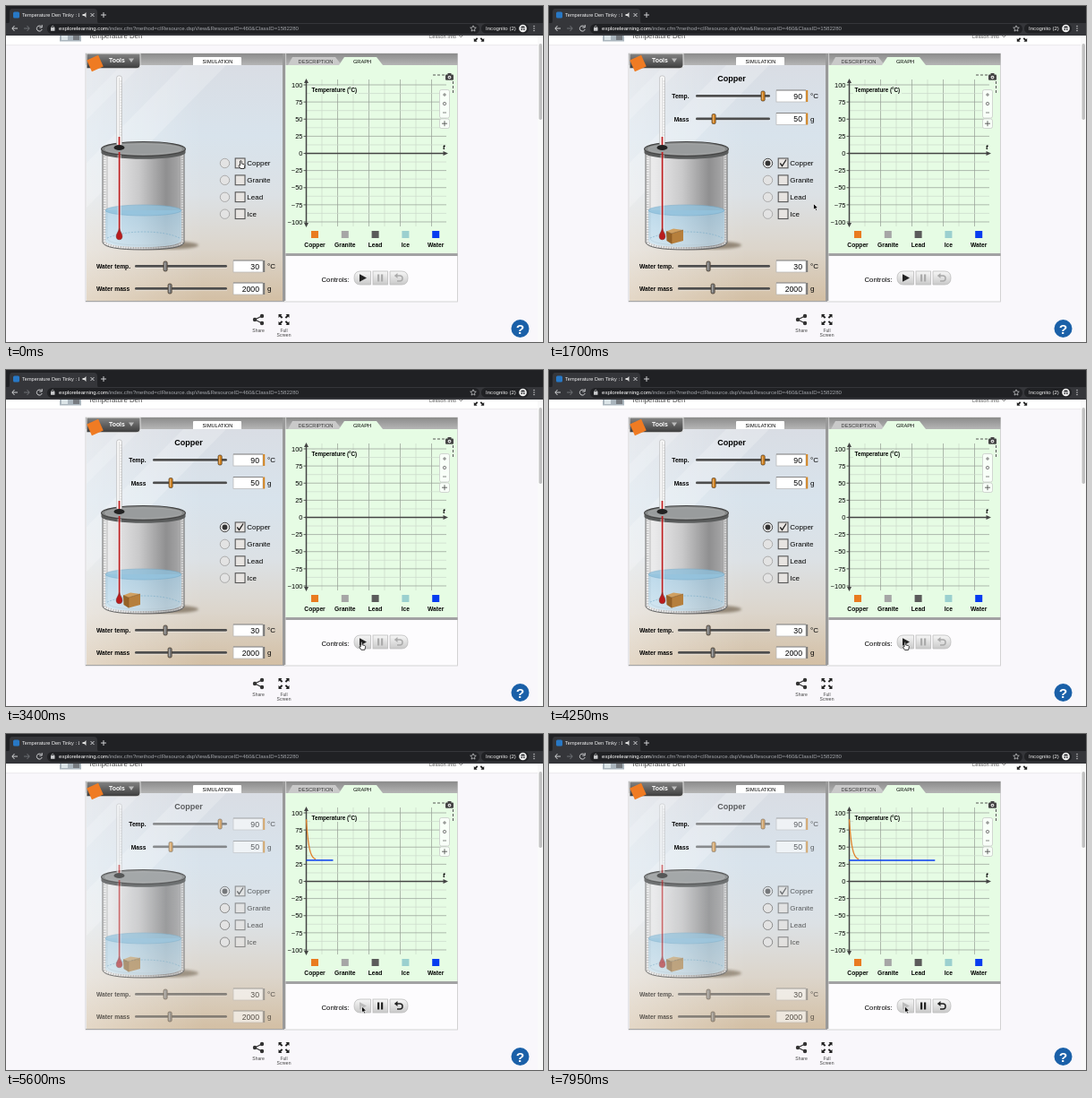
Recreate the animation shown at these times as an HTML page. Size 600x375 px, loop 8 s.

```html
<!DOCTYPE html>
<html lang="en">
<head>
<meta charset="utf-8">
<title>Heat experiment</title>
<style>
html, body { margin: 0; width: 100%; height: 100%; overflow: hidden; background: #fff; }
svg { display: block; width: 100vw; height: 100vh; }
text { font-family: "Liberation Sans", Arial, sans-serif; }
</style>
</head>
<body>
<svg id="stage" viewBox="0 0 600 375"></svg>
<script>
const LOOP = 8000, PICK = 450, START = 4530;
const stage = document.getElementById("stage");

const text = (x, y, size, label, extra = "") => `<text x="${x}" y="${y}" font-size="${size}" ${extra}>${label}</text>`;
const rect = (x, y, w, h, fill, extra = "") => `<rect x="${x}" y="${y}" width="${w}" height="${h}" fill="${fill}" ${extra}/>`;
const path = (d, fill, extra = "") => `<path d="${d}" fill="${fill}" ${extra}/>`;
const line = (d, stroke, width = 1, extra = "") => path(d, "none", `stroke="${stroke}" stroke-width="${width}" ${extra}`);
const oval = (x, y, rx, ry, fill, extra = "") => `<ellipse cx="${x}" cy="${y}" rx="${rx}" ry="${ry}" fill="${fill}" ${extra}/>`;
const gradient = (id, dir, stops) => `<linearGradient id="${id}" x2="${dir === "x" ? 1 : 0}" y2="${dir === "y" ? 1 : 0}">` +
  stops.map(([at, color]) => `<stop offset="${at}" stop-color="${color}"/>`).join("") + "</linearGradient>";
const bold = 'font-weight="bold"', middle = 'text-anchor="middle"', end = 'text-anchor="end"';

const defs = `<defs>
  ${gradient("panel", "y", [[0, "#d9dde4"], [.3, "#d8e3ec"], [.55, "#dce1e5"], [.78, "#dcd5cb"], [1, "#d3bfa4"]])}
  ${gradient("glow", "x", [[0, "#ffffff60"], [.6, "#ffffff00"]])}
  ${gradient("bar", "y", [[0, "#8b8b8b"], [1, "#b5b5b5"]])}
  ${gradient("tools", "y", [[0, "#858585"], [1, "#3c3c3c"]])}
  ${gradient("metal", "x", [[0, "#eee"], [.12, "#e9e9ea"], [.45, "#c9c9ca"], [.78, "#8f8f90"], [.92, "#a2a2a3"], [1, "#ddd"]])}
  ${gradient("water", "y", [[0, "#a9d2ea"], [1, "#c9e4f3"]])}
  ${gradient("button", "y", [[0, "#f7f7f7"], [1, "#c9c9c9"]])}
  <clipPath id="tabClip"><rect x="17" y="4" width="65" height="14"/></clipPath>
  <clipPath id="panelClip"><rect x="90" y="66" width="219" height="263"/></clipPath>
  <filter id="soft"><feGaussianBlur stdDeviation="1.6"/></filter>
</defs>`;

function browser() {
  return rect(0, 0, 600, 20, "#202124") +
    path("M1 20Q4 20 4 16V7Q4 3 7 3H98Q102 3 102 7V16Q102 20 105 20Z", "#35363a") +
    rect(0, 19, 600, 14, "#35363a") + rect(46, 20, 483, 11, "#202124", 'rx="5.5"') +
    rect(8, 6.5, 7, 7, "#2878c5", 'rx="1.5"') +
    text(18, 12.4, 5.6, "Temperature Den Tinky : Le", 'fill="#f0f0f1" clip-path="url(#tabClip)"') +
    path("M85.5 9H87.5L89.5 7V13L87.5 11H85.5Z", "#ddd") +
    line("M94.5 8L98.5 12M98.5 8L94.5 12M106 10H112M109 7V13", "#dedfe1", .9) +
    line("M13 25H7M9.5 22L6.8 25L9.5 28", "#e3e4e6", .9) +
    line("M20 25H26M23.5 22L26.2 25L23.5 28", "#75777b", .9) +
    line("M39.5 23A3 3 0 1 0 40.2 26M40.2 21V24H37.3", "#dedfe1", .9) +
    rect(50, 24, 4.5, 3.8, "#c8c9cb", 'rx=".5"') + line("M51 24V23Q52.2 21 53.5 23V24", "#c8c9cb", .7) +
    text(59, 27, 6.1, '<tspan fill="#fff">explorelearning.com</tspan>/index.cfm?method=cIResource.dspView&amp;ResourceID=460&amp;ClassID=1582280', 'fill="#a2a5aa"') +
    path("M522 21.8L523 24L525.3 24.2L523.5 25.8L524 28.1L522 26.9L520 28.1L520.5 25.8L518.7 24.2L521 24Z", "none", 'stroke="#d0d1d3" stroke-width=".7"') +
    rect(531, 19.8, 53, 10.8, "#202124", 'rx="5.2"') +
    text(536, 27.1, 6.1, "Incognito (2)", 'fill="#eee"') + oval(577.5, 25, 4.3, 4.3, "#f1f1f1") +
    path("M575 24.5H580L579 22.4H576Z", "#35363a") + oval(576.3, 26.2, .9, .9, "#35363a") + oval(578.8, 26.2, .9, .9, "#35363a") +
    [22.5, 25, 27.5].map(y => oval(590, y, .7, .7, "#ddd")).join("");
}

const fullscreen = (x, y, s, color) =>
  `<g transform="translate(${x} ${y}) scale(${s})">` + [0, 90, 180, 270].map(a =>
    `<g transform="rotate(${a})">${path("M-6 -6H-2L-3.3 -4.7L-1.2 -2.6L-2.6 -1.2L-4.7 -3.3L-6 -2Z", color)}</g>`).join("") + "</g>";

function page() {
  return rect(0, 33, 600, 342, "#f9f7fb") + rect(0, 33, 594, 10.5, "#fff") +
    rect(60, 32, 24, 7.5, "#aab5bd") + rect(62, 32, 7, 6, "#dce5e8") + rect(75, 33, 7, 5, "#777b80") +
    text(92, 36.2, 7.8, "Temperature Den", 'fill="#444"') +
    text(473, 35.8, 5.8, "Lesson Info", 'fill="#555"') + line("M506 32.5L508.3 34.8L510.6 32.5", "#555", .9) +
    fullscreen(528.5, 34, .95, "#222") + line("M0 43.6H594", "#e4e3e6", .7) +
    rect(594, 33, 6, 342, "#fafafa") + rect(595.5, 42, 3.5, 85, "#c1c1c1", 'rx="1.7"') +
    browser() +
    line("M286 346L278 350L286 354", "#333", 1.2) +
    [[286, 346], [278, 350], [286, 354]].map(([x, y]) => oval(x, y, 2.2, 2.2, "#333")).join("") +
    text(282, 364, 5, "Share", middle + ' fill="#444"') + fullscreen(310.5, 350, 1, "#222") +
    text(310.5, 364, 5, "Full", middle + ' fill="#444"') + text(310.5, 369, 5, "Screen", middle + ' fill="#444"') +
    oval(574.5, 360, 10, 10, "#1a60a8") + text(574.5, 365.5, 15.5, "?", `${middle} ${bold} fill="#fff"`);
}

function panels() {
  return rect(89, 53, 415.5, 277, "#fdfcfe", 'stroke="#c9c9c9" stroke-width=".8"') +
    rect(90, 66, 219, 263, "url(#panel)") + rect(90, 66, 219, 263, "url(#glow)") +
    `<g clip-path="url(#panelClip)" fill="#fff">
      <path d="M90 175L198 66H246L90 225Z" opacity=".2"/>
      <path d="M90 105L129 66H151L90 127Z" opacity=".16"/>
    </g>` +
    rect(89, 53, 415.5, 13, "url(#bar)") + rect(309, 53, 3.3, 276, "#999") + rect(312.3, 53, .8, 225, "#ddd") +
    line("M89 329.5H311", "#a5a5a5", 1.2) +
    path("M209 66V58Q209 57 210 57H262Q263 57 263 58V66Z", "#fff") + text(236.5, 63.6, 5.6, "SIMULATION", middle) +
    path("M90 53H150V66Q150 69.8 146 69.8H90Z", "url(#tools)", 'stroke="#eee" stroke-width=".9"') +
    text(115, 63, 6.9, "Tools", bold + ' fill="#fff"') + path("M137 58.5H143L140 63Z", "#bbb") +
    rect(92.5, 57, 14, 14, "#ef7b23", 'transform="rotate(-24 99.5 64)"') +
    rect(312.5, 276, 192, 3, "#858585", 'opacity=".75"') + rect(312.5, 66, 191.5, 210, "#e6fce4") +
    path("M315 66L320 57H368L375 66Z", "#c9c9c9") + path("M372 66L378 57H414L421 66Z", "#e6fce4") +
    text(346, 63.6, 5.7, "DESCRIPTION", middle + ' fill="#333"') + text(398, 63.6, 5.7, "GRAPH", middle);
}

function graph() {
  let out = "";
  for (let i = 1; i < 9; i++)
    out += line(`M${335.5 + 17.5 * i} 82V246`, i % 2 ? "#cbd9ca" : "#949d94", .7);
  for (let i = 0; i <= 16; i++)
    out += line(`M335 ${88 + 9.56 * i}H492`, i % 2 ? "#cbd9ca" : "#949d94", .7);
  for (let value = 100; value >= -100; value -= 25) {
    const y = 164.5 - value * .765;
    out += line(`M332.5 ${y}H335`, "#333", .8) + text(331.5, y + 2.7, 7.5, String(value).replace("-", "−"), end);
  }
  out += line("M335.5 84V244M334 164.5H490", "#444", 1.5) +
    path("M335.5 81L338 86H333ZM335.5 247L338 242H333ZM494 164.5L488.5 162V167Z", "#444") +
    rect(340, 89, 54, 9, "#e6fce4") + text(341.5, 95.8, 6.3, "Temperature (°C)", bold) +
    text(488, 159.5, 8, "t", bold + ' font-style="italic"');
  [["Copper", "#e97b20"], ["Granite", "#a6a6a6"], ["Lead", "#5b5b5b"], ["Ice", "#9bd0cf"], ["Water", "#073cf0"]].forEach(([name, color], i) => {
    const x = 345 + 33.8 * i;
    out += rect(x - 4, 251, 8, 8, color) + text(x, 269, 6.7, name, `${middle} ${bold}`);
  });
  return out + rect(484.5, 93.5, 11, 31.5, "#f8fff8", 'rx="2" stroke="#c4c4c4" stroke-width=".7"') +
    rect(484.5, 126, 11, 10.5, "#f8fff8", 'rx="2" stroke="#c4c4c4" stroke-width=".7"') +
    line("M488 99H492M490 97V101M488 119H492", "#666", .8) + oval(490, 109, 1.7, 1.7, "none", 'stroke="#666" stroke-width=".8"') +
    line("M487 131.2H493M490 128.2V134.2", "#555", .9) + line("M477 77H490M499.5 84V99", "#444", .9, 'stroke-dasharray="3 2"') +
    rect(491, 76.5, 9, 6.2, "#444", 'rx="1"') + rect(493.5, 75, 4, 2, "#444") + oval(495.5, 79.6, 1.8, 1.8, "#fff") + oval(495.5, 79.6, .9, .9, "#444");
}

function slider(y, from, knob, value, unit, accent) {
  return rect(from, y - 1.5, 247 - from, 2.8, "#4d4d4d", 'rx="1.4"') + line(`M${from + 1} ${y + 1.8}H247`, "#fff", .6, 'opacity=".7"') +
    rect(knob - 2, y - 5.5, 4.2, 11, accent, 'rx="1.5" stroke="#4a3a2a" stroke-width=".7"') + line(`M${knob - .5} ${y - 4}V${y + 4}`, "#fff", .7, 'opacity=".55"') +
    rect(254, y - 6.5, 33, 13, "#fff", 'stroke="#b4b4b4" stroke-width=".7"') + line(`M254 ${y - 6.5}H287`, "#777", .8) +
    rect(287.2, y - 6.5, 2, 13, accent) +
    text(283, y + 3.1, 8.7, value, end) + text(292, y + 2.8, 8, unit);
}

function beaker() {
  const body = "M108 161V264Q111 272 153 272Q196 272 199 264V161Z";
  const wall = "M110.3 165V264Q115 270.3 153 270.3Q192 270.3 197 264V165";
  return oval(180, 267, 35, 4.5, "#6b5b47", 'opacity=".65" filter="url(#soft)"') +
    path(body, "url(#metal)", 'stroke="#555" stroke-width=".9"') +
    path("M113 163V260Q118 267 153 267Q188 267 194 260V163Z", "none", 'stroke="#777" stroke-width=".6" opacity=".7"') +
    path("M111 228V262Q114 269 153 269Q192 269 196 262V228Z", "url(#water)", 'opacity=".7"') +
    oval(153.5, 228, 42.5, 6, "#8fc1dd", 'opacity=".8" stroke="#6fa8c8" stroke-width=".6"') +
    line("M113 259Q130 252 153 252Q180 252 194 259", "#76a9c6", .6, 'stroke-dasharray="2 1.5"') +
    line(wall, "#777", 2.2, 'stroke-dasharray="1.2 1.6" opacity=".65"') + line(wall, "#fff", .7, 'opacity=".7"') +
    path("M106.5 159.5V164C110 173 197 173 200.5 164V159.5Z", "#5b5d5d") +
    oval(153.5, 159.5, 47, 8, "#858888", 'stroke="#444" stroke-width="1.1"') +
    oval(153.5, 159.7, 43, 6, "#999c9d", 'stroke="#bbb" stroke-width=".5"');
}

function thermometer() {
  let ticks = "";
  for (let y = 84; y < 145; y += 3) ticks += `M127.5 ${y}H129.3`;
  return rect(123.7, 78, 5.6, 78, "#fafafa", 'rx="2" stroke="#aaa" stroke-width=".6"') + line(ticks, "#888", .35) +
    line("M126.5 80V146", "#ccc", .7) + line("M126.5 146V157", "#bf1f20", 1.7) +
    oval(126.5, 158, 6, 3, "#222") + line("M125.2 166V251M128.1 166V251", "#fff", .8, 'opacity=".8"') +
    line("M126.6 163V253", "#bf1f20", 1.7) +
    path("M126.6 248C127.8 253 130.4 254.5 129.9 258A3.4 3.4 0 0 1 123.2 258C122.7 254.5 125.4 253 126.6 248Z", "#b91c1d", 'stroke="#753030" stroke-width=".5"');
}

const cube = path("M131 251.5L139 248.5L150 250L137 254Z", "#d0a061") +
  path("M131 251.5L137 254V265.5L131.5 262Z", "#966327") + path("M137 254L150 250V262L137 265.5Z", "#b67f3c") +
  line("M131 251.5L137 254V265.5M137 254L150 250", "#805321", .5);

const rows = ["Copper", "Granite", "Lead", "Ice"].map((name, i) => ({ name, y: 175.5 + 18.9 * i }));
const choices = rows.map(({ name, y }) =>
  rect(256.2, y - 5.5, 10.8, 10.8, "#e7e4e1", 'stroke="#555" stroke-width="1.1"') + text(269.3, y + 2.8, 8, name)).join("");
const radios = (list, color) => list.map(({ y }) =>
  oval(244.5, y, 5.2, 5.2, "#e3e3e3", `stroke="${color}" stroke-width="1"`)).join("");

const copperTop = text(204, 84, 9, "Copper", `${middle} ${bold}`) + slider(100.5, 164, 239, "90", "°C", "#d3831f") + slider(126, 164, 184, "50", "g", "#d3831f");
const copperLabels = text(156.5, 103, 6.7, "Temp.", `${end} ${bold}`) + text(156.5, 128.5, 6.7, "Mass", `${end} ${bold}`);
const copperMarks = radios([rows[0]], "#444") + oval(244.5, 175.5, 2.9, 2.9, "#333") + line("M258.3 175.5L260.5 178.5L265 171.5", "#222", 1.3);
const waterControls = text(101, 293, 6.7, "Water temp.", bold) + text(101, 318, 6.7, "Water mass", bold) +
  slider(290.5, 144, 178, "30", "°C", "#777") + slider(315.5, 144, 183, "2000", "g", "#777");

const buttons = text(352.5, 308.3, 7.75, "Controls:") +
  path("M396 296H407.5V311H396Q389 311 389 303.5Q389 296 396 296Z", "url(#button)", 'stroke="#bcbcbc" stroke-width=".8"') +
  rect(410, 296, 16.5, 15, "url(#button)", 'stroke="#bcbcbc" stroke-width=".8"') +
  path("M429 296H442Q449 296 449 303.5Q449 311 442 311H429Z", "url(#button)", 'stroke="#bcbcbc" stroke-width=".8"') +
  path("M395 299.3L403 303.5L395 307.7Z", "#222", 'id="play"') +
  `<g id="others" color="#aaa">${rect(415, 299.5, 2.2, 8, "currentColor")}${rect(419, 299.5, 2.2, 8, "currentColor")}
   ${line("M436.5 301H440A2.9 2.9 0 0 1 440 307H437", "currentColor", 1.5)}${path("M437.5 298L433.8 301L437.5 304Z", "currentColor")}</g>`;

const arrow = path("M0 0V7L1.7 5.5L2.9 8.1L4.1 7.5L3 5H5.2Z", "#000", 'stroke="#fff" stroke-width=".7"');
const hand = path("M-.5 0Q.5 -1 1.2 0V3L4 3.6Q5.2 4 4.7 6L4 8.5H0L-2 5.3Q-1.8 4.2 -.5 5Z", "#fff", 'stroke="#111" stroke-width=".8"');

stage.innerHTML = defs + page() + panels() +
  `<g id="beaker">${beaker()}</g>
  <g id="sim">${thermometer()}<g id="copperSim">${cube}${copperTop}</g>${choices}${waterControls}<g id="marks">${copperMarks}</g></g>
  <g id="labels">${copperLabels}</g><g id="firstRadio">${radios([rows[0]], "#aaa")}</g>
  <g id="radioIdle">${radios(rows.slice(1), "#aaa")}</g><g id="radioRun">${radios(rows.slice(1), "#8a8a8a")}</g>` +
  graph() + line("", "#e0802c", 1.3, 'id="copperLine"') + line("", "#073cf0", 1.5, 'id="waterLine"') + buttons +
  `<g id="cursor"><g id="arrow">${arrow}</g><g id="hand">${hand}</g></g>`;

const part = id => stage.querySelector("#" + id);
const show = (id, on) => part(id).setAttribute("display", on ? "inline" : "none");

const stops = [[700, 262, 173], [1450, 295.5, 220.5], [1850, 295.5, 220.5], [2550, 348.5, 291.5], [2750, 348.5, 291.5], [3450, 397.5, 304]];
function pointer(t) {
  if (t <= stops[0][0]) return stops[0].slice(1);
  const next = stops.findIndex(stop => stop[0] > t);
  if (next < 0) return stops.at(-1).slice(1);
  const [t0, x0, y0] = stops[next - 1], [t1, x1, y1] = stops[next];
  const u = (t - t0) / (t1 - t0), k = u * u * (3 - 2 * u);
  return [x0 + (x1 - x0) * k, y0 + (y1 - y0) * k];
}

function curves(t) {
  const head = 335.5 + Math.max(0, t - START) * .028;
  let d = "M335.5 95.2";
  for (let x = 335.5; x <= Math.min(head, 346); x += .5)
    d += `L${x} ${140.9 - 45.7 * Math.exp((335.5 - x) / 2.9)}`;
  part("copperLine").setAttribute("d", d);
  part("waterLine").setAttribute("d", `M335.5 140.9H${head}`);
}

function draw(t) {
  const picked = t >= PICK, running = t >= START;
  for (const id of ["copperSim", "labels", "marks"]) show(id, picked);
  show("firstRadio", !picked);
  show("radioIdle", !running);
  show("radioRun", running);
  part("sim").setAttribute("opacity", running ? .6 : 1);
  part("beaker").setAttribute("opacity", running ? .85 : 1);
  part("play").setAttribute("fill", running ? "#bbb" : "#222");
  part("others").setAttribute("color", running ? "#222" : "#aaa");
  show("copperLine", running);
  show("waterLine", running);
  curves(t);
  const [x, y] = pointer(t);
  const overLink = (x < 268 && y < 182) || (!running && x > 389 && y > 296);
  part("cursor").setAttribute("transform", `translate(${x} ${y})`);
  show("arrow", !overLink);
  show("hand", overLink);
}

const began = performance.now();
function tick() {
  draw((performance.now() - began) % LOOP);
  requestAnimationFrame(tick);
}
tick();
</script>
</body>
</html>
```
